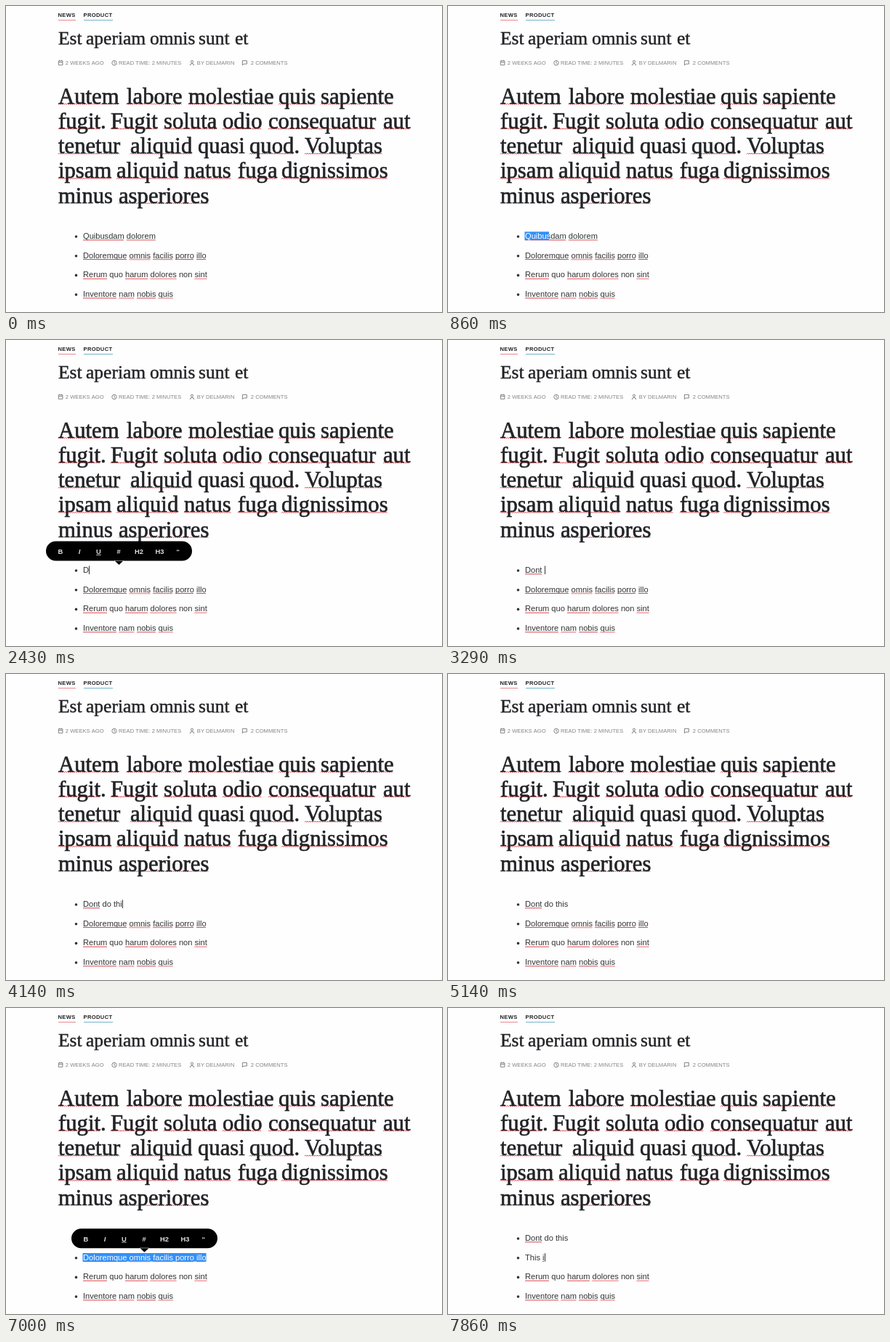
An HTML page with a canvas for the animation above (8000 ms loop, 600 by 422 pixels).

```html
<!DOCTYPE html>
<html lang="en">
<head>
<meta charset="utf-8">
<title>Inline list editing</title>
<style>
  html, body { margin: 0; width: 100%; height: 100%; overflow: hidden; background: #fefefe; }
  canvas { display: block; }
</style>
</head>
<body>
<canvas id="stage" width="600" height="422"></canvas>
<script>
const ctx = document.getElementById('stage').getContext('2d');
const LOOP = 8000, STEP = 1000 / 7;
const INK = '#222326', BODY = '#333', MUTED = '#85858a', ERROR = '#e0434c';
const SANS = '"Liberation Sans", Arial, sans-serif';
const SERIF = '"Liberation Serif", "Times New Roman", serif';
const LIST = { x: 106, y: 321, pitch: 26.7, font: '11.1px ' + SANS };

// Each entry is "x word"; a leading underscore marks a misspelling.
const TITLE = '72 Est 110 aperiam 198 omnis 265 sunt 315 et';
const HEADING = [
  '72 _Autem 166 _labore 251 _molestiae 375 _quis 433 _sapiente',
  '72 _fugit. 144 _Fugit 217 _soluta 298 _odio 361 _consequatur 519 _aut',
  '72 _tenetur 171 _aliquid 264 quasi 335 _quod. 411 _Voluptas',
  '72 _ipsam 152 _aliquid 245 _natus 319 _fuga 379 _dignissimos',
  '72 minus 155 _asperiores'
];
const ITEMS = [
  'Quibusdam dolorem',
  'Doloremque omnis facilis porro illo',
  'Rerum quo harum dolores non sint',
  'Inventore nam nobis quis'
];
const CORRECT = new Set(['quo', 'non', 'do', 'this', 'This', 'is']);

// Times are counted in steps of one seventh of a second.
const EDITS = [
  { text: 'Dont do this', drag: [5, 8], show: 8.5, hide: 19, center: 155.5, lastKey: 30,
    typed: s => s < 23 ? Math.min(4, s - 16) : s - 18 },
  { text: 'This i', drag: [44, 46], show: 46.5, hide: 52, center: 190.5, lastKey: 55,
    typed: s => s - 49 }
];

const clamp = (v, lo = 0, hi = 1) => Math.min(hi, Math.max(lo, v));

function label(text, x, y, font, color) {
  ctx.font = font;
  ctx.fillStyle = color;
  ctx.fillText(text, x, y);
}

function line(color, width, ...points) {
  ctx.strokeStyle = color;
  ctx.lineWidth = width;
  ctx.beginPath();
  points.forEach(([x, y]) => ctx.lineTo(x, y));
  ctx.stroke();
}

function squiggle(x, y, width, height, half) {
  const points = [];
  for (let i = 0; i * half <= width; i++) points.push([x + i * half, y + (i % 2 ? -height : height)]);
  line(ERROR, 1, ...points);
}

function placedWords(row, y, size, weight) {
  ctx.font = size + 'px ' + SERIF;
  for (const [, x, wrong, word] of row.matchAll(/(\d+) (_?)(\S+)/g)) {
    if (wrong) squiggle(+x, y + .6, ctx.measureText(word.replace('.', '')).width, .7, 1.4);
    ctx.fillStyle = ctx.strokeStyle = INK;
    ctx.lineWidth = weight;
    ctx.fillText(word, +x, y);
    ctx.strokeText(word, +x, y);
  }
}

function icons() {
  ctx.strokeStyle = '#77777c';
  ctx.lineWidth = .9;
  ctx.beginPath();
  ctx.rect(72.3, 75.8, 5.6, 5.5);
  ctx.moveTo(72.3, 77.8); ctx.lineTo(77.9, 77.8);
  ctx.moveTo(73.8, 74.5); ctx.lineTo(73.8, 76);
  ctx.moveTo(76.4, 74.5); ctx.lineTo(76.4, 76);
  ctx.moveTo(152.2, 78.5); ctx.arc(149, 78.5, 3.2, 0, 7);
  ctx.moveTo(149, 76.5); ctx.lineTo(149, 78.7); ctx.lineTo(150.4, 79.4);
  ctx.moveTo(257.6, 76.7); ctx.arc(256, 76.7, 1.6, 0, 7);
  ctx.moveTo(253.3, 82); ctx.quadraticCurveTo(253.3, 79.4, 256, 79.4);
  ctx.quadraticCurveTo(258.7, 79.4, 258.7, 82);
  ctx.moveTo(325.4, 75.4); ctx.lineTo(331.4, 75.4); ctx.lineTo(331.4, 80);
  ctx.lineTo(327, 80); ctx.lineTo(325.4, 81.6); ctx.closePath();
  ctx.stroke();
}

function article() {
  ctx.letterSpacing = '.35px';
  label('NEWS', 71.5, 15, 'bold 7.6px ' + SANS, INK);
  label('PRODUCT', 106.5, 15, 'bold 7.6px ' + SANS, INK);
  ctx.letterSpacing = '0px';
  line('#e58a90', 1, [72, 19.5], [96, 19.5]);
  line('#74b4c8', 1, [107, 19.5], [147, 19.5]);
  placedWords(TITLE, 53, 25.5, .45);
  icons();
  [['2 WEEKS AGO', 81.8], ['READ TIME: 2 MINUTES', 155], ['BY DELMARIN', 262.8], ['2 COMMENTS', 336.8]]
    .forEach(([text, x]) => label(text, x, 81.2, '7.62px ' + SANS, MUTED));
  HEADING.forEach((row, i) => placedWords(row, 134.5 + 34.25 * i, 30.7, .65));
}

function listItem(row, text, edited) {
  const { x, font } = LIST, y = LIST.y + LIST.pitch * row;
  ctx.fillStyle = BODY;
  ctx.beginPath();
  ctx.arc(96.5, y - 3, 1.8, 0, 7);
  ctx.fill();
  label(text, x, y, font, BODY);
  for (const { 0: word, index } of text.matchAll(/\S+/g)) {
    const unfinished = edited && index + word.length === text.length;
    if (CORRECT.has(word) || unfinished) continue;
    squiggle(x + ctx.measureText(text.slice(0, index)).width, y + 1.8, ctx.measureText(word).width, .4, 1);
  }
}

function selection(row, text, amount) {
  const { x, font } = LIST, y = LIST.y + LIST.pitch * row;
  ctx.font = font;
  ctx.save();
  ctx.beginPath();
  ctx.rect(x - .5, y - 9.7, (ctx.measureText(text).width + .5) * amount, 11.6);
  ctx.clip();
  ctx.fillStyle = '#3390f8';
  ctx.fillRect(0, y - 15, 600, 30);
  label(text, x, y, font, '#fff');
  ctx.restore();
}

function toolbar(center, row, shown) {
  const scale = 1 - .04 * (1 - shown);
  ctx.save();
  ctx.globalAlpha = shown;
  ctx.translate(center, 291 + LIST.pitch * row + 5 * (1 - shown));
  ctx.scale(scale, scale);
  ctx.fillStyle = '#000';
  ctx.beginPath();
  ctx.roundRect(-100.5, -13.5, 201, 27, 13.5);
  ctx.moveTo(-6.5, 13); ctx.lineTo(0, 19); ctx.lineTo(6.5, 13);
  ctx.fill();
  ctx.textAlign = 'center';
  [['B', -80.5], ['I', -54.5], ['U', -28], ['#', -.5], ['H2', 27.5], ['H3', 56], ['“', 81]]
    .forEach(([text, x]) => label(text, x, 3.9, (text === 'I' ? 'italic ' : '') + 'bold 9.4px ' + SANS, '#ddd'));
  line('#ddd', .9, [-31.3, 5.4], [-24.7, 5.4]);
  ctx.restore();
}

function caret(row, text, idle) {
  if (Math.floor(idle / 530) % 2) return;
  ctx.font = LIST.font;
  const x = Math.round(LIST.x + ctx.measureText(text).width) + .5, y = LIST.y + LIST.pitch * row;
  line(BODY, 1, [x, y - 9.5], [x, y + 2]);
}

function draw(time) {
  const step = Math.floor((time % LOOP + 5) / STEP);
  ctx.fillStyle = '#fefefe';
  ctx.fillRect(0, 0, 600, 422);
  article();

  ITEMS.forEach((text, row) => {
    const edit = EDITS[row];
    const count = edit ? clamp(edit.typed(step), 0, edit.text.length) : 0;
    const current = count ? edit.text.slice(0, count) : text;
    listItem(row, current, count > 0 && count < (edit.text.length));
    if (!edit) return;
    const [from, to] = edit.drag;
    const selected = count ? 0 : clamp((step - from) / (to - from));
    if (selected) selection(row, text, selected);
    const next = EDITS[row + 1];
    if (count && !(next && step > next.drag[0])) {
      caret(row, current, Math.max(0, step - edit.lastKey) * STEP);
    }
  });

  EDITS.forEach((edit, row) => {
    const shown = clamp(Math.min((step - edit.show) / 2, (edit.hide - step) / 2));
    if (shown) toolbar(edit.center, row, shown);
  });
}

function tick() {
  draw(performance.now());
  requestAnimationFrame(tick);
}
tick();
</script>
</body>
</html>
```
